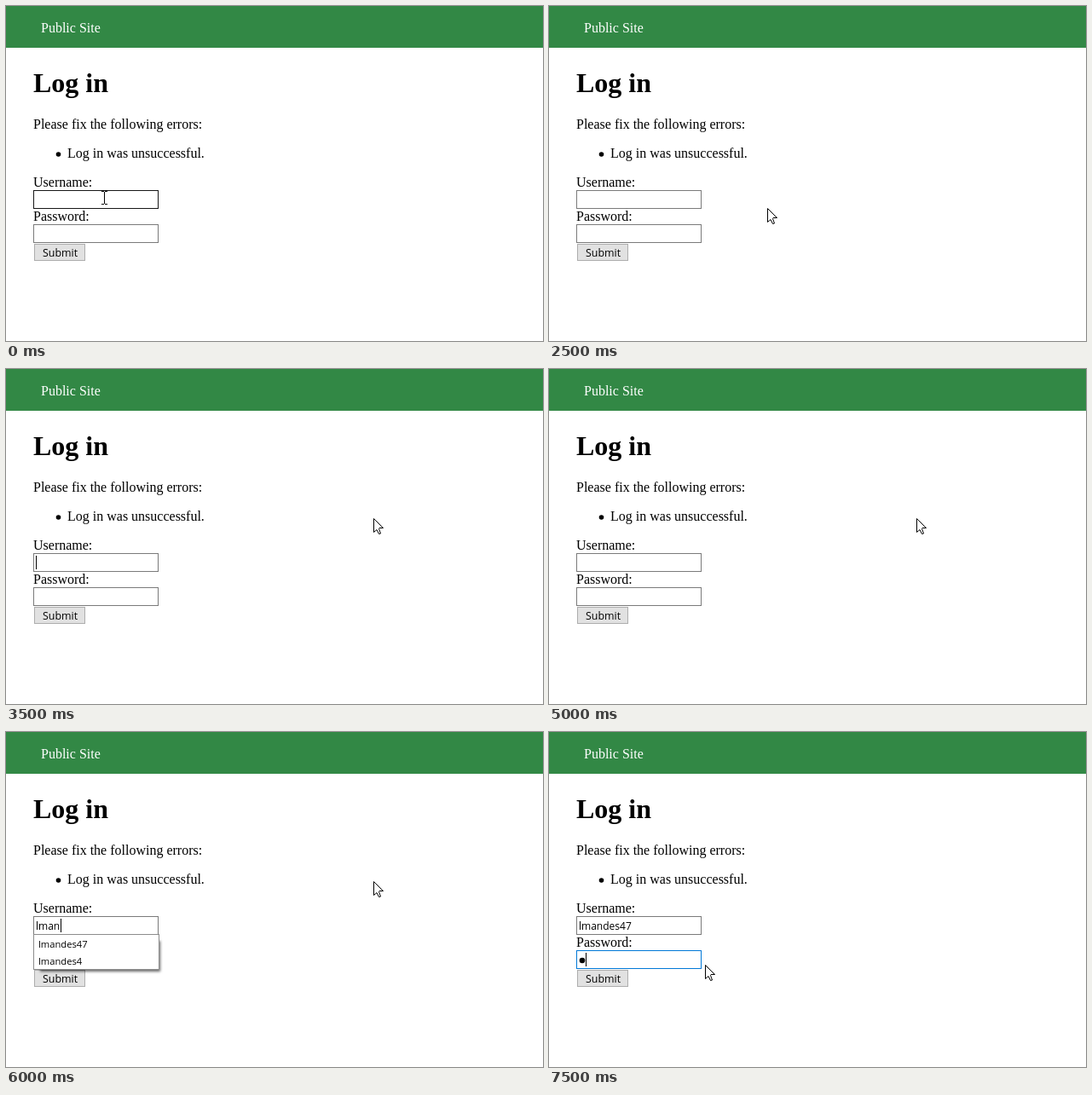
Animation, 630 px wide and 393 px high, one loop 8000 ms. Source, as an HTML page with a canvas:

```html
<!DOCTYPE html>
<html lang="en">
<head>
<meta charset="utf-8">
<title>Log in</title>
<style>
  html, body { margin: 0; width: 100%; height: 100%; overflow: hidden; background: #fff; }
  canvas { display: block; }
</style>
</head>
<body>
<canvas id="stage" width="630" height="393"></canvas>
<script>
const ctx = document.getElementById('stage').getContext('2d');
const SERIF = '"Liberation Serif", serif';
const SANS = '"Open Sans", sans-serif';
const LOOP = 8000;
const GRAY = '#7a7a7a', DARK = '#171717', BLUE = '#0078d7';
const USER = 'lmandes47';
const SUGGESTIONS = [USER, 'lmandes4'];

// Each step holds until the next; values carry over unless replaced.
const steps = [
  { at: 0, beam: [112, 217], arrow: null, border: DARK, typed: '', caret: null, list: false, pass: false, dots: 0 },
  { at: 500, beam: [106, 227] },
  { at: 1500, beam: [119, 223] },
  { at: 2000, beam: [136, 222] },
  { at: 2500, beam: null, arrow: [256, 237], border: GRAY },
  { at: 3000, beam: [139, 219], arrow: null, border: DARK },
  { at: 3500, beam: null, arrow: [431, 175], border: GRAY, caret: 'user' },
  { at: 4000, caret: null },
  { at: 4500, caret: 'user' },
  { at: 5000, caret: null },
  { at: 5500, caret: 'user', typed: USER.slice(0, 2), list: true },
  { at: 6000, typed: USER.slice(0, 4) },
  { at: 6500, typed: USER, list: false, caret: 'pass', pass: true },
  { at: 7000, arrow: [352, 170] },
  { at: 7500, arrow: [183, 273], dots: 1 }
];

function stateAt(time) {
  return Object.assign({}, ...steps.filter(s => s.at <= time));
}

function text(str, x, y, font, color = '#000') {
  ctx.font = font;
  ctx.fillStyle = color;
  ctx.fillText(str, x, y);
}

function rect(x, y, w, h, color) {
  ctx.fillStyle = color;
  ctx.fillRect(x, y, w, h);
}

function box(x, y, w, h, fill, border) {
  rect(x, y, w, h, border);
  rect(x + 1, y + 1, w - 2, h - 2, fill);
}

function dot(x, y, r) {
  ctx.fillStyle = '#000';
  ctx.beginPath();
  ctx.arc(x, y, r, 0, Math.PI * 2);
  ctx.fill();
}

function drawPage() {
  rect(0, 0, 630, 393, '#fff');
  rect(0, 0, 630, 49, '#328845');
  text('Public Site', 41, 31, '16px ' + SERIF, '#fff');
  text('Log in', 32, 101, 'bold 32px ' + SERIF);
  const body = '16px ' + SERIF;
  text('Please fix the following errors:', 32, 144, body);
  dot(61.5, 174, 2.8);
  text('Log in was unsuccessful.', 72, 178, body);
  text('Username:', 32, 212, body);
  text('Password:', 32, 252, body);
  box(33, 279, 60, 20, '#e1e1e1', '#adadad');
  text('Submit', 43, 294, '12.4px ' + SANS);
}

function drawList() {
  ctx.save();
  ctx.shadowColor = 'rgba(0,0,0,0.6)';
  ctx.shadowBlur = 3;
  ctx.shadowOffsetX = ctx.shadowOffsetY = 2;
  rect(38, 243, 141, 36, '#888');
  ctx.restore();
  box(32, 237, 148, 42, '#fff', '#8c8c8c');
  SUGGESTIONS.forEach((name, i) => text(name, 38, 253 + i * 20, '11.2px ' + SANS));
}

function drawBeam(x, y) {
  for (const row of [y, y + 15]) {
    rect(x, row, 3, 1, '#000');
    rect(x + 4, row, 3, 1, '#000');
  }
  rect(x + 3, y + 1, 1, 14, '#000');
}

function drawArrow(x, y) {
  const points = [[0, 0], [0, 16], [3.5, 13], [6, 18], [8, 17.5], [6, 12], [6.5, 11], [11, 11]];
  ctx.beginPath();
  points.forEach(([px, py]) => ctx.lineTo(x + px + 0.5, y + py + 0.5));
  ctx.closePath();
  ctx.fillStyle = '#fff';
  ctx.fill();
  ctx.strokeStyle = '#000';
  ctx.lineWidth = 1;
  ctx.stroke();
}

function drawFields(s) {
  box(32, 216, 147, 22, '#fff', s.border);
  box(32, 256, 147, 22, '#fff', s.pass ? BLUE : GRAY);
  text(s.typed, 35, 232, '12px ' + SANS);
  const end = Math.ceil(35 + ctx.measureText(s.typed).width);
  for (let i = 0; i < s.dots; i++) dot(39 + i * 8, 268, 3.3);
  if (s.list) drawList();
  if (s.caret === 'user') rect(end, 219, 1, 16, '#000');
  if (s.caret === 'pass') rect(35 + s.dots * 8, 259, 1, 16, '#000');
}

function draw(time) {
  const s = stateAt(time);
  drawPage();
  drawFields(s);
  if (s.beam) drawBeam(...s.beam);
  if (s.arrow) drawArrow(...s.arrow);
}

const start = performance.now();
function tick() {
  draw((performance.now() - start) % LOOP);
  requestAnimationFrame(tick);
}
tick();
</script>
</body>
</html>
```
